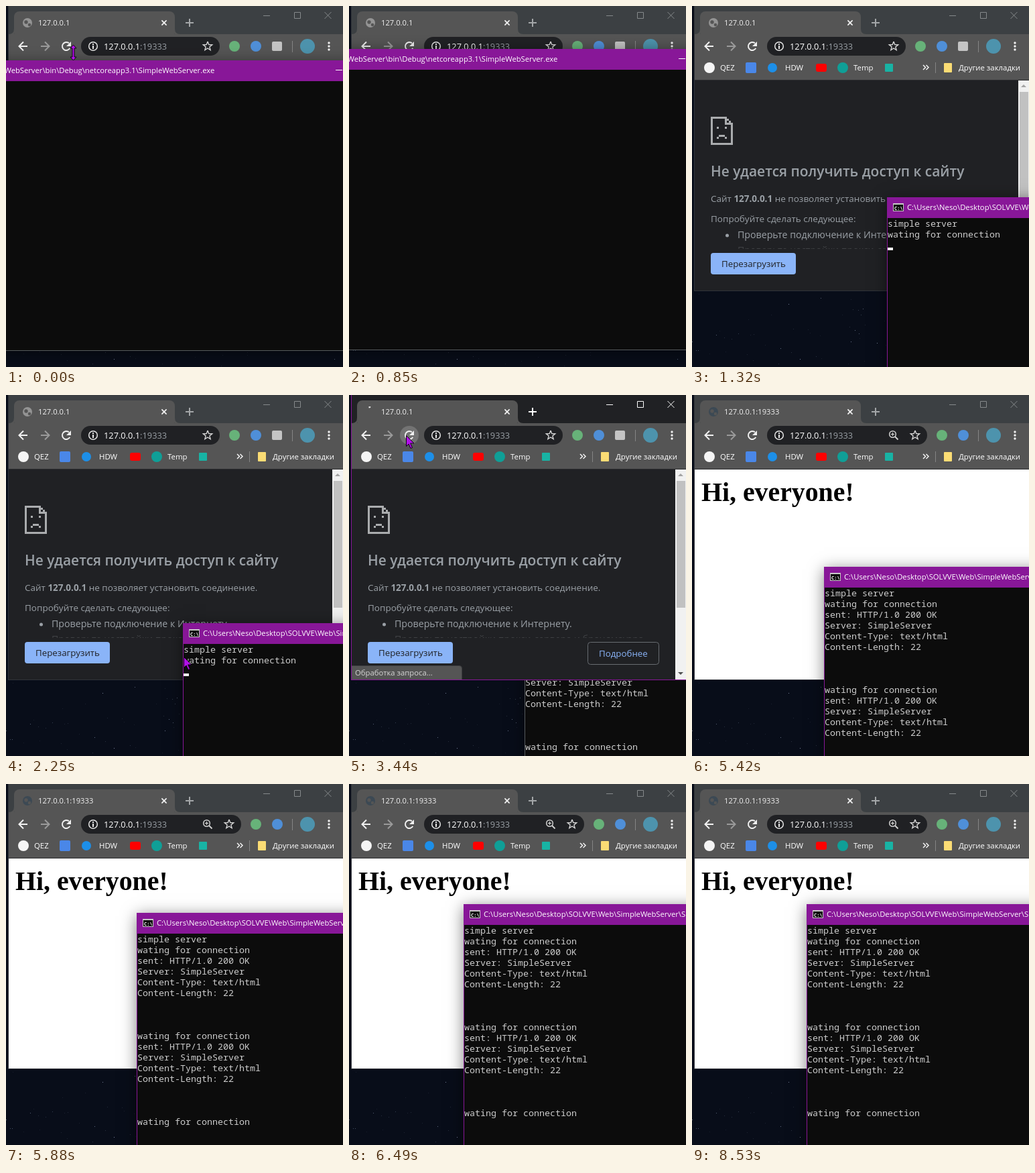
An HTML page with a canvas that plays this animation: 503 px wide and 538 px high, repeating every 8750 ms.

```html
<!DOCTYPE html>
<html lang="ru">
<head>
<meta charset="utf-8">
<title>Simple web server</title>
<style>
  html, body { margin: 0; width: 100%; height: 100%; overflow: hidden; background: #080c16; }
  canvas { display: block; width: 503px; height: 538px; }
</style>
</head>
<body>
<canvas id="stage" width="503" height="538"></canvas>
<script>
const W = 503, H = 538, LOOP = 8750, STEP = 117;
const CLICK = 3320, LOADED = 3800, REFOCUS = 4970, GONE = 4040;
const c = document.getElementById('stage').getContext('2d');
const UI = '"Open Sans", "Noto Sans", sans-serif';
const MONO = '"Noto Sans Mono", "DejaVu Sans Mono", monospace';
const SERIF = '"Liberation Serif", "Noto Serif", serif';
const ACCENT = '#881798', BAR = '#555', LIGHT = '#f1f1f1', DARK = '#202124', GRAY = '#9aa0a6';

// Drags towards (x, y); ease is the power of the vertical slowdown.
const drags = [
  { from: 120, to: 350, x: -363, y: 64, ease: 1 },
  { from: 850, to: 1660, x: 314, y: 335, ease: 2 },
  { from: 1770, to: 2580, x: 262, y: 341, ease: 2 },
  { from: REFOCUS, to: 5780, x: 195, y: 192, ease: 1 },
  { from: 5880, to: 6000, x: 191, y: 180, ease: 1 },
  { from: 6240, to: 6490, x: 171, y: 179, ease: 1 }
];
const sweeps = [
  { from: 1770, to: 2580, x: 257, y: 398, ease: 2 },
  { from: 2700, to: 2950, x: 32, y: 62, ease: 2 },
  { from: CLICK, to: 3440, x: 85, y: 60, ease: 1 },
  { from: 3690, to: GONE, x: W, y: 350, ease: 1 }
];

const reply = ['sent: HTTP/1.0 200 OK', 'Server: SimpleServer',
  'Content-Type: text/html', 'Content-Length: 22', '', '', '', 'wating for connection'];
const title = 'C:\\Users\\Neso\\Desktop\\SOLVVE\\Web\\SimpleWebServer\\' +
  'SimpleWebServer\\bin\\Debug\\netcoreapp3.1\\SimpleWebServer.exe';

const mix = (a, b, f) => a + (b - a) * f;
const easeOut = (p, power) => 1 - (1 - p) ** power;

// Progress from 0 to 1 in even jumps of about one STEP.
function stepped(t, from, to) {
  const n = Math.round((to - from) / STEP);
  const i = Math.floor((t - from) / (to - from) * n + 0.15);
  return Math.max(0, Math.min(1, i / n));
}

function follow(moves, t, x, y) {
  for (const m of moves) {
    const p = stepped(t, m.from, m.to);
    x = mix(x, m.x, easeOut(p, 4));
    y = mix(y, m.y, easeOut(p, m.ease));
  }
  return [Math.round(x), Math.round(y)];
}

function rect(x, y, w, h, color) {
  c.fillStyle = color;
  c.fillRect(x, y, w, h);
}

function paint(fill, stroke, lw = 1) {
  if (fill) {
    c.fillStyle = fill;
    c.fill();
  }
  if (stroke) {
    c.strokeStyle = stroke;
    c.lineWidth = lw;
    c.stroke();
  }
}

function box(x, y, w, h, r, fill, stroke) {
  c.beginPath();
  c.roundRect(x, y, w, h, r);
  paint(fill, stroke);
}

function disc(x, y, r, color) {
  c.beginPath();
  c.arc(x, y, r, 0, 7);
  paint(color);
}

function ring(x, y, r, color, lw, a = 0, b = 2 * Math.PI) {
  c.beginPath();
  c.arc(x, y, r, a, b);
  paint(null, color, lw);
}

function trace(p) {
  c.beginPath();
  for (let i = 0; i < p.length; i += 2) c.lineTo(p[i], p[i + 1]);
}

function line(color, lw, ...p) {
  trace(p);
  paint(null, color, lw);
}

function poly(fill, ...p) {
  trace(p);
  c.closePath();
  paint(fill);
}

function text(s, x, y, size, color, weight = 400, font = UI) {
  c.font = `${weight} ${size}px ${font}`;
  c.fillStyle = color;
  c.fillText(s, x, y);
  return x + c.measureText(s).width;
}

function cross(x, y, r, color, lw) {
  line(color, lw, x - r, y - r, x + r, y + r);
  line(color, lw, x - r, y + r, x + r, y - r);
}

function plus(x, y, r, color, lw) {
  line(color, lw, x - r, y, x + r, y);
  line(color, lw, x, y - r, x, y + r);
}

// dir 1 points right, -1 left.
function chevron(x, y, r, dir, color, lw) {
  line(color, lw, x - r * dir, y - r, x, y, x - r * dir, y + r);
}

function arrow(x, y, dir, color) {
  line(color, 2, x - 6 * dir, y, x + 6 * dir, y);
  chevron(x + 6.5 * dir, y, 6.5, dir, color, 2);
}

function triangle(x, y, r, dir, color) {
  poly(color, x - r, y, x + r, y, x, y + r * dir);
}

function desktop() {
  rect(0, 0, W, H, '#080d19');
  let seed = 11;
  const rnd = () => (seed = seed * 16807 % 2147483647) / 2147483647;
  for (let i = 0; i < 80; i++) {
    const bright = rnd() ** 3;
    rect(rnd() * W | 0, 426 + rnd() * 112 | 0, 1, 1, `rgba(160,175,205,${0.1 + bright * 0.7})`);
  }
}

function tabStrip(focused, loading, done, t) {
  rect(4, 0, W - 4, 42, focused ? DARK : '#3c4043');
  box(12, 8, 240, 40, 8, BAR);
  for (const [x, dir] of [[12, -1], [252, 1]]) {
    c.beginPath();
    c.moveTo(x, 34);
    c.quadraticCurveTo(x, 42, x + 8 * dir, 42);
    c.lineTo(x, 42);
    paint(BAR);
  }
  if (loading) {
    const a = -1.95 + (t - 3440) / 150;
    ring(32, 25, 7, '#e8e8e8', 2, a, a + 0.4);
  } else {
    disc(32, 25, 7, done ? '#3c4954' : '#949494');
    disc(30, 24, 2.7, BAR);
    disc(35, 28, 2.3, BAR);
  }
  text(done ? '127.0.0.1:19333' : '127.0.0.1', 48, 29, 11.2, LIGHT);
  cross(236, 25, 3.6, LIGHT, 1.7);
  plus(274, 25, 6, focused ? '#fff' : '#a3a6a8', 2);
  const tone = focused ? '#fff' : '#85898b';
  rect(384, 14, 10, 1, tone);
  box(430.5, 9.5, 9, 9, 0, null, tone);
  cross(480.5, 14, 5, tone, 1);
}

function star(x, y) {
  const p = [];
  for (let i = 0; i <= 10; i++) {
    const a = i * Math.PI / 5 - Math.PI / 2, r = i % 2 ? 3 : 7;
    p.push(x + r * Math.cos(a), y + r * Math.sin(a));
  }
  line('#d5d5d5', 1.4, ...p);
}

function toolbar(done, hover) {
  rect(4, 42, W - 4, 69, BAR);
  arrow(26, 60, -1, LIGHT);
  arrow(58, 60, 1, '#9a9a9a');
  if (hover) disc(90, 60, 14, '#737373');
  ring(90, 60, 6, LIGHT, 2, 0.5, 5.4);
  poly(LIGHT, 97, 53, 97, 60, 90, 60);

  const right = done ? 351 : 319, ext = right + 22;
  box(112, 46, right - 112, 28, 14, DARK);
  ring(130, 60, 6.3, '#e8e8e8', 1.5);
  rect(129, 59, 2, 5, '#e8e8e8');
  rect(129, 56, 2, 2, '#e8e8e8');
  const x = text('127.0.0.1', 146, 65, 12.8, '#fff');
  text(':19333', x, 65, 12.8, GRAY);
  star(right - 18, 60);
  if (done) {
    ring(299.5, 58.5, 4.8, '#d5d5d5', 1.5);
    line('#d5d5d5', 1.8, 303, 62, 307.5, 66.5);
    plus(299.5, 58.5, 2.5, '#d5d5d5', 1.2);
  } else {
    box(ext + 56, 53, 15, 14, 2, '#c4c4c4');
  }
  disc(ext, 60, 8, '#67b279');
  disc(ext + 32, 60, 8, '#4f8fd8');
  rect(427, 52, 1, 17, '#858585');
  disc(450, 60, 11, '#4d93ad');
  for (let i = -1; i <= 1; i++) disc(482, 60 + 5 * i, 1.7, LIGHT);
}

function bookmarks() {
  const label = (s, x) => text(s, x, 96, 11.4, '#fff');
  disc(26, 92, 8, '#f5f5f5');
  label('QEZ', 42);
  box(80, 84, 16, 16, 2, '#4a87e8');
  disc(120, 92, 7, '#1d8fe8');
  label('HDW', 139);
  box(185, 86, 16, 12, 3, '#f00');
  disc(225, 92, 8, '#0f9f97');
  label('Temp', 241);
  box(288, 86, 12, 12, 1, '#18b3a4');
  for (const x of [348.5, 353]) chevron(x, 91.5, 3.5, 1, LIGHT, 1.5);
  rect(363, 84, 1, 16, '#858585');
  box(376, 85, 12, 14, 1, '#fbdc74');
  label('Другие закладки', 398);
}

// Sad document on a grid of 11 by 14 cells of 3 pixels.
function sadPage() {
  const cell = (col, row, w = 1, h = 1) =>
    rect(28 + col * 3, 165 + row * 3, w * 3, h * 3, '#aaacae');
  cell(0, 0, 8);
  cell(0, 13, 11);
  cell(0, 0, 1, 14);
  cell(10, 3, 1, 11);
  cell(7, 0, 1, 4);
  cell(7, 3, 4);
  cell(8, 1);
  cell(9, 2);
  cell(4, 9, 3);
  for (const col of [3, 7]) {
    cell(col, 5);
    cell(col, 10);
  }
}

function errorPage() {
  rect(4, 111, W - 4, 313, DARK);
  sadPage();
  text('Не удается получить доступ к сайту', 28, 254, 20.95, GRAY, 600);
  let x = text('Сайт ', 28, 292, 13.5, GRAY);
  x = text('127.0.0.1', x, 292, 13.5, GRAY, 700);
  text(' не позволяет установить соединение.', x, 292, 13.5, GRAY);
  text('Попробуйте сделать следующее:', 28, 322, 13.5, GRAY);
  disc(52.5, 342, 2.5, GRAY);
  text('Проверьте подключение к Интернету.', 68, 346, 14.2, GRAY);
  text('Проверьте настройки прокси-сервера и брандмауэра.', 68, 369, 14.2, '#404245');
  rect(4, 362, 483, 62, DARK);
  box(28, 368, 127, 32, 4, '#8ab4f8');
  text('Перезагрузить', 44, 389, 13.3, DARK);
  box(356.5, 368.5, 106, 33, 4, null, '#686c71');
  text('Подробнее', 373, 390, 13.3, '#8ab4f8');

  rect(487, 111, 16, 313, LIGHT);
  rect(489, 128, 13, 189, '#c1c1c1');
  triangle(495, 121, 4, -1, '#a3a3a3');
  triangle(495, 413, 4, 1, '#505050');
}

function browser(t) {
  const focused = t >= CLICK && t < REFOCUS, done = t >= LOADED;
  const loading = focused && !done;
  tabStrip(focused, loading, done, t);
  toolbar(done, loading);
  bookmarks();
  if (done) {
    rect(4, 111, W - 4, 313, '#fff');
    text('Hi, everyone!', 14, 158, 39.8, '#000', 700, SERIF);
  } else {
    errorPage();
  }
  rect(4, 110, W - 4, 1, '#2b2c2e');
  if (loading) {
    box(3.5, 403.5, 165, 21, [0, 4, 0, 0], BAR, '#3c3d3f');
    text('Обработка запроса...', 9, 418, 11.3, '#d6d6d6');
  }
  const edge = focused ? ACCENT : '#30343a';
  rect(3, 0, 1, 425, edge);
  rect(3, 424, W - 3, 1, edge);
}

function consoleWindow(t, x, y) {
  const w = 975, bottom = t < 850 ? 514 : y + 449;
  const active = t < CLICK || t >= REFOCUS;
  c.save();
  c.shadowColor = 'rgba(0,0,0,.5)';
  c.shadowBlur = 22;
  c.shadowOffsetY = 4;
  rect(x, y, w, bottom - y, '#0c0c0c');
  c.restore();
  rect(x, y, w, 31, ACCENT);
  rect(x, y + 31, 1, bottom - y - 31, active ? ACCENT : '#555a5c');
  rect(x, bottom - 1, w, 1, '#555a5c');

  rect(x + 9, y + 9, 16, 12, '#c9c9c9');
  rect(x + 10, y + 11, 14, 9, '#0c0c0c');
  text('C:\\', x + 11, y + 19, 7, '#fff', 700, MONO);
  text(title, x + 30, y + 19, 11.24, '#fff');
  rect(x + w - 120, y + 14, 10, 1, '#fff');

  const rows = ['simple server', 'wating for connection'];
  if (t >= CLICK) rows.push(...reply);
  if (t >= LOADED) rows.push(...reply);
  rows.forEach((s, i) => text(s, x + 1, y + 44 + i * 16, 13.333, '#ccc', 400, MONO));
  const blink = t >= 6950 && Math.floor((t - 6950) / 526) % 2 === 0;
  if (t < CLICK || blink) rect(x + 1, y + 43 + rows.length * 16, 8, 4, '#f2f2f2');
}

function cursorShape(x, y, ...p) {
  c.save();
  c.translate(x + 0.5, y + 0.5);
  c.lineJoin = 'round';
  trace(p);
  c.closePath();
  paint('#b010e8', '#100014');
  c.restore();
}

function pointer(x, y) {
  cursorShape(x, y, 0, 0, 0, 16, 3.5, 12.5, 6.5, 19, 9, 18, 6.2, 11.5, 11.5, 11.5);
}

function resizer(x, y) {
  const p = [];
  for (const s of [1, -1]) p.push(0, -11.5 * s, 4.5 * s, -6.5 * s, 1.5 * s, -6.5 * s, 1.5 * s, 6.5 * s, 4.5 * s, 6.5 * s);
  cursorShape(x, y, ...p);
}

function draw(t) {
  const [x, y] = follow(drags, t, -363, 81);
  const layers = [() => browser(t), () => consoleWindow(t, x, y)];
  if (t >= CLICK && t < REFOCUS) layers.reverse();
  desktop();
  for (const layer of layers) layer();
  if (t < 350) resizer(100, y - 12);
  else if (t >= 1770 && t < GONE) pointer(...follow(sweeps, t, W, 356));
}

const start = performance.now();
function tick() {
  draw((performance.now() - start) % LOOP);
  requestAnimationFrame(tick);
}
tick();
</script>
</body>
</html>
```
